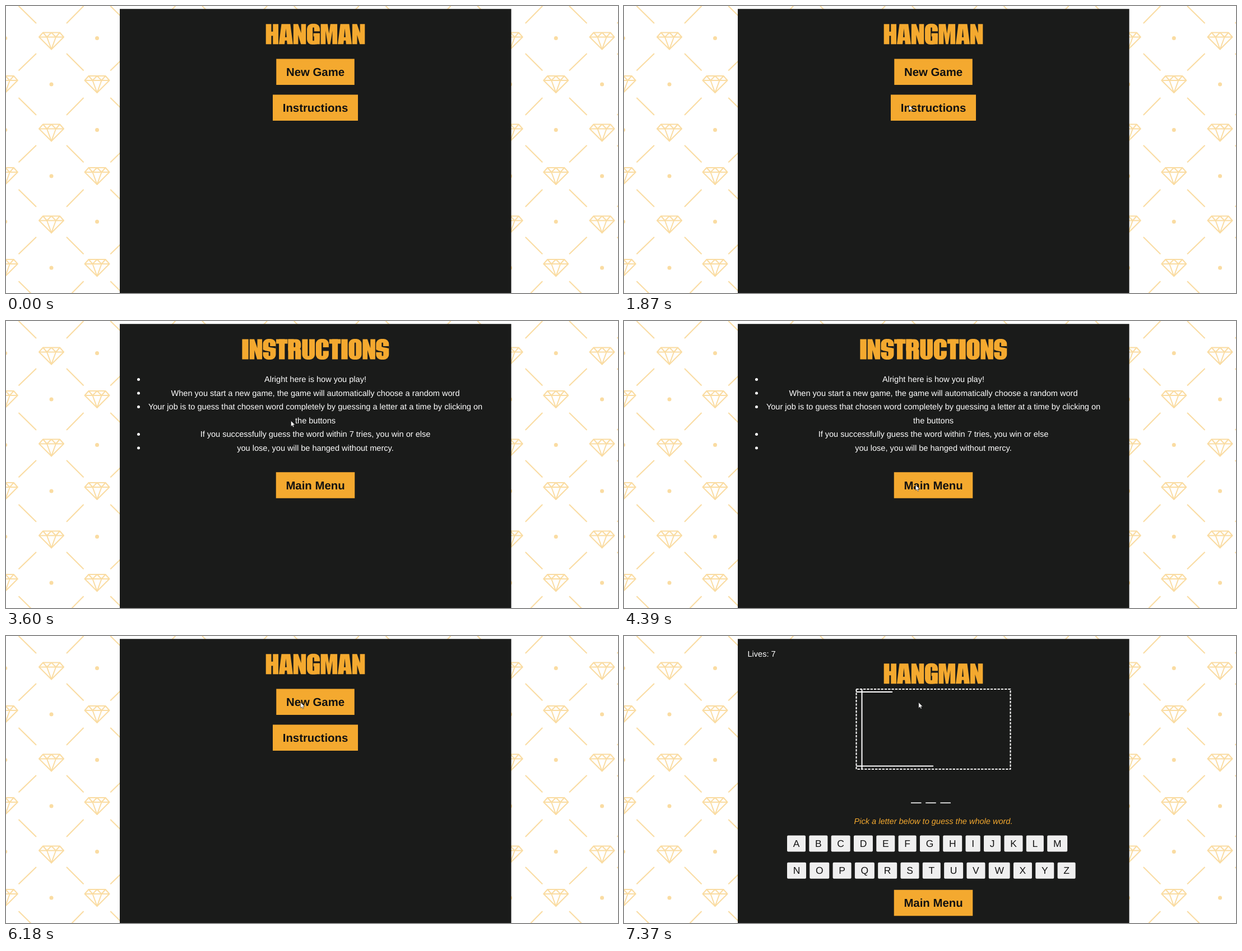
Animation of 1092x513 px, one loop 8000 ms. Source, as an HTML page with a canvas:

```html
<!DOCTYPE html>
<html lang="en">
<head>
<meta charset="utf-8">
<title>Hangman</title>
<style>
html, body { margin: 0; width: 100%; height: 100%; overflow: hidden; background: #fff; }
canvas { display: block; }
</style>
</head>
<body>
<canvas id="stage" width="1092" height="513" aria-label="Hangman game"></canvas>
<script>
const LOOP = 8000;
const DARK = '#1a1b1a', GOLD = '#f4a92f', PALE = '#fadca2';
const MID = 552, EM = 14.55, CAP = 36;
const FONT = '"Liberation Sans", Arial, sans-serif';
const g = document.getElementById('stage').getContext('2d');
g.textRendering = 'geometricPrecision';

function box(x, y, w, h, r = 0, color = GOLD) {
  g.fillStyle = color;
  g.beginPath();
  g.roundRect(x, y, w, h, r);
  g.fill();
}

function trace(points) {
  g.beginPath();
  for (let i = 0; i < points.length; i += 2) g.lineTo(points[i], points[i + 1]);
}

function poly(points, color = GOLD) {
  trace(points);
  g.closePath();
  g.fillStyle = color;
  g.fill();
}

function line(...points) {
  trace(points);
  g.stroke();
}

function text(str, x, y, { size = EM, style = '', color = '#fff', align = 'center' } = {}) {
  g.font = `${style} ${size}px ${FONT}`;
  g.textAlign = align;
  g.fillStyle = color;
  g.fillText(str, x, y);
}

// Heavy condensed capitals for the headings
const cut = (x, y, w, h, r = 0) => box(x, y, w, h, r, DARK);
function ring() {
  box(0, -0.5, 23, 37, 9);
  cut(10.2, 6, 2.6, 24, 1.3);
}

const GLYPHS = {
  H: { w: 22.3, gap: 1, draw() {
    box(0, 0, 9.7, CAP);
    box(12.6, 0, 9.7, CAP);
    box(9, 13.5, 4.5, 7.5);
  } },
  A: { w: 25, gap: -0.1, draw() {
    poly([4.6, 0, 20.4, 0, 25, CAP, 14.8, CAP, 14.2, 29.5, 10.8, 29.5, 10.2, CAP, 0, CAP]);
    poly([12.5, 8, 14, 23.5, 11, 23.5], DARK);
  } },
  N: { w: 22.4, gap: 1, draw() {
    poly([0, 0, 8.4, 0, 13.8, 16, 13.8, 0, 22.4, 0, 22.4, CAP, 13.4, CAP, 8.6, 19.5, 8.6, CAP, 0, CAP]);
  } },
  G: { w: 22.8, gap: 0.8, draw() {
    ring();
    cut(12, 13, 12, 3.5);
    box(11.5, 16.5, 11.3, 5.5);
    box(16, 17, 6.8, 19);
  } },
  M: { w: 29.5, gap: 1, draw() {
    poly([0, 0, 12.3, 0, 14.7, 17, 17.2, 0, 29.5, 0, 29.5, CAP, 20.8, CAP, 20.8, 12,
      17, CAP, 12.5, CAP, 8.7, 12, 8.7, CAP, 0, CAP]);
  } },
  I: { w: 11.3, gap: 1, draw() { box(0, 0, 11.3, CAP); } },
  T: { w: 20.5, gap: 0.1, draw() {
    box(0, 0, 20.5, 8);
    box(5.1, 0, 10.3, CAP);
  } },
  O: { w: 23, gap: 0.9, draw: ring },
  C: { w: 23, gap: 0.8, draw() {
    ring();
    cut(12, 14.5, 12, 6.5);
  } },
  U: { w: 22.7, gap: 1, draw() {
    box(0, 0, 22.7, 36.5, [0, 0, 9, 9]);
    cut(10, -1, 2.7, 31, 1.3);
  } },
  R: { w: 23, gap: 0.9, draw() {
    box(0, 0, 10, CAP);
    box(0, 0, 22.8, 19, [0, 8, 6, 0]);
    box(0, 15, 20, 6);
    box(12.7, 17, 10.2, 19, [0, 4, 0, 0]);
    cut(10, 6, 2.7, 8.5, 1.2);
  } },
  S: { w: 23, gap: 0.4, draw() {
    box(0, -0.5, 23, 37, 9);
    cut(10, 6, 2.7, 8, 1.3);
    poly([10.5, 12, 12.7, 12.5, 23, 12.5, 23, 16.5, 19, 15.5, 12.5, 14.5], DARK);
    cut(10.3, 22, 2.7, 8, 1.3);
    poly([12.5, 24, 10.3, 23.3, 0, 23.3, 0, 18.5, 4, 20.5, 10.5, 21.8], DARK);
  } }
};

function heading(word, top) {
  const letters = [...word].map(c => GLYPHS[c]);
  const advance = l => l.w + 2 * l.gap;
  let x = MID - letters.reduce((sum, l) => sum + advance(l), 0) / 2;
  for (const l of letters) {
    g.save();
    g.translate(x + l.gap, top);
    l.draw();
    g.restore();
    x += advance(l);
  }
}

// Wallpaper
function gem(x, y) {
  line(x - 15, y, x + 15, y, x + 22, y + 8, x, y + 30, x - 22, y + 8, x - 15, y,
    x - 8, y + 8, x, y, x + 8, y + 8, x + 15, y);
  line(x - 22, y + 8, x + 22, y + 8);
  line(x - 8, y + 8, x, y + 30, x + 8, y + 8);
}

function tile(x, y) {
  gem(x + 81, y + 47.5);
  gem(x + 162.5, y + 125);
  box(x + 159, y + 54, 7, 7, 3.5, PALE);
  box(x + 77.5, y + 136.5, 7, 7, 3.5, PALE);
  line(x + 22.5, y, x + 54, y + 31);
  line(x + 108, y + 31, x + 138.5, y);
  line(x + 22.5, y + 115.5, x + 54, y + 85);
  line(x + 108, y + 85, x + 138.5, y + 115.5);
}

function wallpaper() {
  g.fillStyle = '#fff';
  g.fillRect(0, 0, 1092, 513);
  g.strokeStyle = PALE;
  g.lineWidth = 2;
  g.lineJoin = 'round';
  for (let c = -1; c < 7; c++)
    for (let r = 0; r < 4; r++) tile(c * 163.75, r * 164);
  box(203, 5.3, 698.5, 520, 0, DARK);
}

// Screens
function button(label, y, w) {
  box(MID - w / 2, y, w, 46.5);
  text(label, MID, y + 30.6, { size: EM * 1.4, style: 'bold', color: '#111' });
}

function menu() {
  heading('HANGMAN', 32.3);
  button('New Game', 94.4, 139.5);
  button('Instructions', 158.5, 152);
}

const RULES = [
  'Alright here is how you play!',
  'When you start a new game, the game will automatically choose a random word',
  'Your job is to guess that chosen word completely by guessing a letter at a time by clicking on',
  'the buttons',
  'If you successfully guess the word within 7 tries, you win or else',
  'you lose, you will be hanged without mercy.'
];

function instructions() {
  heading('INSTRUCTIONS', 32.5);
  RULES.forEach((rule, i) => {
    const y = 109 + i * 24.5;
    text(rule, MID, y);
    if (i !== 3) box(234, y - 7, 5, 5, 2.5, '#fff');
  });
  button('Main Menu', 270.3, 140.5);
}

function keys(letters, y) {
  let x = 291;
  const size = EM * 1.2;
  for (const c of letters) {
    g.font = `${size}px ${FONT}`;
    const w = g.measureText(c).width + 21.4;
    box(x, y, w, 29, 2, '#efefef');
    text(c, x + w / 2, y + 20.6, { size, color: '#111' });
    x += w + 6.3;
  }
}

function game() {
  text('Lives: 7', 220.5, 37, { align: 'left' });
  heading('HANGMAN', 49.3);
  g.strokeStyle = '#fff';
  g.lineWidth = 2;
  g.setLineDash([4.2, 2.1]);
  g.strokeRect(414.5, 95, 275, 143);
  g.setLineDash([]);
  line(424.5, 95, 424.5, 238);
  line(414.5, 100, 479, 100);
  line(414.5, 232.5, 552, 232.5);
  g.lineWidth = 1.6;
  for (let i = 0; i < 3; i++) line(512 + i * 26.2, 298.3, 530.5 + i * 26.2, 298.3);
  text('Pick a letter below to guess the whole word.', MID, 336, { style: 'italic', color: GOLD });
  keys('ABCDEFGHIJKLM', 356.5);
  keys('NOPQRSTUVWXYZ', 404.7);
  button('Main Menu', 453.8, 140.5);
}

// Pointer: each move is a curve from one rest to the next
const smooth = k => k * k * (3 - 2 * k);
const slowing = k => 1 - (1 - k) ** 2;
const MOVES = [
  { t: 580, end: 1360, from: [1041, 503], via: [790, 250], to: [571, 118.5], ease: slowing },
  { t: 1360, end: 1870, from: [571, 118.5], via: [535, 140], to: [508.5, 177], ease: smooth },
  { t: 3570, end: 4390, from: [508.5, 178], via: [512, 240], to: [520.3, 293], ease: smooth },
  { t: 5550, end: 6180, from: [520.3, 293], via: [515, 205], to: [525.8, 118.8], ease: smooth }
];

function pointer(t) {
  const m = MOVES.findLast(m => t >= m.t);
  if (!m || t < 580) return;
  const k = m.ease(Math.min(1, (t - m.t) / (m.end - m.t)));
  const at = i => (1 - k) ** 2 * m.from[i] + 2 * k * (1 - k) * m.via[i] + k * k * m.to[i];
  g.save();
  g.translate(at(0), at(1));
  poly([0, 0, 0, 10, 2.3, 7.9, 3.8, 11.3, 5.4, 10.6, 3.9, 7.3, 7, 7.1], '#fff');
  g.strokeStyle = '#222';
  g.lineWidth = 0.6;
  g.stroke();
  g.restore();
}

function draw(now) {
  const t = now % LOOP;
  wallpaper();
  if (t >= 7270) game();
  else if (t >= 2080 && t < 5080) instructions();
  else menu();
  pointer(t);
}

const start = performance.now();
function tick() {
  draw(performance.now() - start);
  requestAnimationFrame(tick);
}
tick();
</script>
</body>
</html>
```
